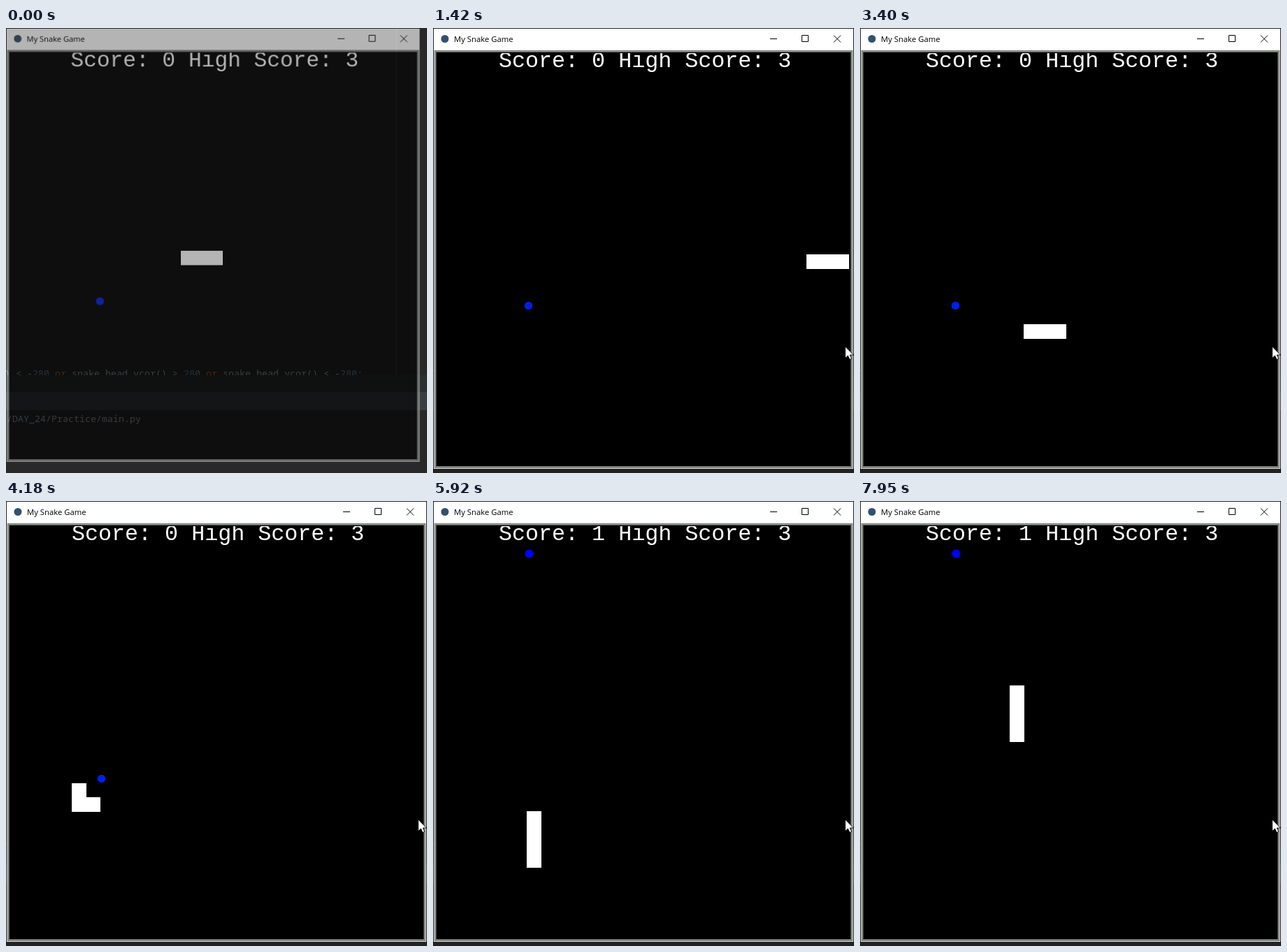
Animation, 602 px wide and 637 px high, one loop 8000 ms. Source, as an HTML page with a canvas:

```html
<!DOCTYPE html>
<html lang="en">
<head>
<meta charset="utf-8">
<title>My Snake Game</title>
<style>
  html, body { margin: 0; width: 100%; height: 100%; overflow: hidden; background: #222; }
  canvas { display: block; }
</style>
</head>
<body>
<canvas id="stage" width="602" height="637"></canvas>
<script>
const W = 602, H = 637, LOOP = 8000, CELL = 20, TICK = 80;
const stage = document.getElementById('stage').getContext('2d');
const layer = document.createElement('canvas');
layer.width = W;
layer.height = H;
const win = layer.getContext('2d');

// Bursts of snake moves: [start in ms, number of moves]
const bursts = [
  [70, 1], [220, 4], [620, 3], [940, 3], [1260, 3], [1580, 3], [1890, 4], [2290, 3],
  [2610, 4], [3010, 3], [3320, 4], [3710, 3], [4020, 4], [4420, 3], [4730, 3], [5040, 4],
  [5440, 3], [5760, 4], [6150, 3], [6460, 3], [6770, 3], [7080, 4], [7480, 3], [7790, 3]
];
const moveTimes = bursts.flatMap(([start, n]) =>
  Array.from({ length: n }, (_, i) => start + i * TICK));

const headings = { R: [1, 0], L: [-1, 0], U: [0, -1], D: [0, 1] };

// Every cell the head visits, beginning with the three cells of a new snake
function trace(turns) {
  const cells = [[254, 324], [274, 324], [294, 324]];
  for (const turn of turns.split(' ')) {
    const [dx, dy] = headings[turn[0]];
    for (let i = 0; i < +turn.slice(1); i++) {
      const [x, y] = cells[cells.length - 1];
      cells.push([x + dx * CELL, y + dy * CELL]);
    }
  }
  return cells;
}
const firstRun = trace('R14');
const secondRun = trace('R5 D5 L15 U6 R2 D12 R4 U14');
const RESET_MOVE = 15, EAT_MOVE = 37;

function gameAt(t) {
  const moves = moveTimes.filter(time => time <= t).length;
  const again = moves >= RESET_MOVE;
  const n = again ? moves - RESET_MOVE : moves;
  const length = again && n > EAT_MOVE ? 4 : 3;
  return {
    snake: (again ? secondRun : firstRun).slice(n + 3 - length, n + 3),
    score: again && n >= EAT_MOVE ? 1 : 0
  };
}

function rect(c, color, x, y, w, h) {
  c.fillStyle = color;
  c.fillRect(x, y, w, h);
}

function disc(c, color, x, y, r) {
  c.fillStyle = color;
  c.beginPath();
  c.arc(x, y, r, 0, 2 * Math.PI);
  c.fill();
}

function text(c, color, font, str, x, y) {
  c.fillStyle = color;
  c.font = font;
  c.fillText(str, x, y);
}

function drawEditor(shade) {
  const mono = '13.33px "Noto Sans Mono", monospace';
  const plain = '#a9b7c6', number = '#6897bb', keyword = '#cc7832';
  rect(stage, '#2b2b2b', 0, 0, W, H);
  rect(stage, '#444444', 558, 0, 1, 497);
  const code = [
    [') < -', plain], ['280', number], [' or ', keyword], ['snake.head.ycor() > ', plain],
    ['280', number], [' or ', keyword], ['snake.head.ycor() < -', plain],
    ['280', number], [':', plain]
  ];
  let x = -2;
  for (const [part, color] of code) {
    text(stage, color, mono, part, x, 499);
    x += part.length * 8;
  }
  rect(stage, '#2d3333', 0, 497, W, 24);
  rect(stage, '#3d4143', 0, 521, W, 26);
  rect(stage, '#2b2b2b', 0, 547, W, H - 547);
  text(stage, '#9db2c8', mono, '/DAY_24/Practice/main.py', 1, 564);
  rect(stage, `rgba(0,0,0,${shade})`, 0, 0, W, H);
}

function drawTitleBar() {
  rect(win, '#fff', 1, 1, 600, 31);
  disc(win, '#34506e', 17, 15.5, 5.5);
  text(win, '#000', '11.3px "Open Sans", sans-serif', 'My Snake Game', 30, 20);
  win.strokeStyle = '#000';
  win.lineWidth = 1;
  win.beginPath();
  win.moveTo(482, 15.5);
  win.lineTo(492, 15.5);
  win.rect(527.5, 10.5, 9, 9);
  win.moveTo(573, 10.5);
  win.lineTo(583, 20.5);
  win.moveTo(583, 10.5);
  win.lineTo(573, 20.5);
  win.stroke();
}

function drawWindow({ snake, score }) {
  win.clearRect(0, 0, W, H);
  drawTitleBar();
  rect(win, '#e6e6e6', 1, 32, 600, 599);
  rect(win, '#6b706b', 2, 32, 598, 598);
  rect(win, '#a0a4a0', 3, 33, 596, 596);
  rect(win, '#50564f', 4, 34, 594, 594);
  rect(win, '#000', 5, 35, 592, 592);

  win.save();
  win.beginPath();
  win.rect(5, 36, 592, 591);
  win.clip();
  text(win, '#fff', '31.7px "Courier New", "Liberation Mono", monospace',
    `Score: ${score} High Score: 3`, 94, 55.5);
  win.restore();

  if (score) disc(win, '#00f', 137.5, 75.5, 6);
  else disc(win, '#0020e0', 136.5, 397.5, 5.8);
  for (const [x, y] of snake) rect(win, '#fff', x, y, CELL + 1, CELL + 1);
}

const pointerStops = [[860, 595, 302], [940, 592, 400], [1020, 590, 448], [1100, 589.5, 456]];
const pointerShape = [[0, 0], [0, 16.5], [3.8, 13], [6.4, 18.5], [9, 17.3], [6.6, 12], [11.8, 12]];

function drawPointer(t) {
  const stop = pointerStops.filter(([time]) => time <= t).pop();
  if (!stop) return;
  stage.beginPath();
  for (const [x, y] of pointerShape) stage.lineTo(stop[1] + x, stop[2] + y);
  stage.closePath();
  stage.fillStyle = '#fff';
  stage.fill();
  stage.strokeStyle = '#000';
  stage.lineWidth = 0.8;
  stage.stroke();
}

// The window opens in three hard steps: scale, opacity, shadow
function openingAt(t) {
  if (t < 70) return [0.984, 0.65, 0.05];
  if (t < 150) return [0.996, 0.93, 0.15];
  return [1, 1, 0.22];
}

function draw() {
  const t = performance.now() % LOOP;
  const [scale, opacity, shade] = openingAt(t);
  drawEditor(shade);
  drawWindow(gameAt(t));
  stage.globalAlpha = opacity;
  stage.drawImage(layer, 0, 0, W * scale, H * scale);
  stage.globalAlpha = 1;
  drawPointer(t);
  requestAnimationFrame(draw);
}
draw();
</script>
</body>
</html>
```
